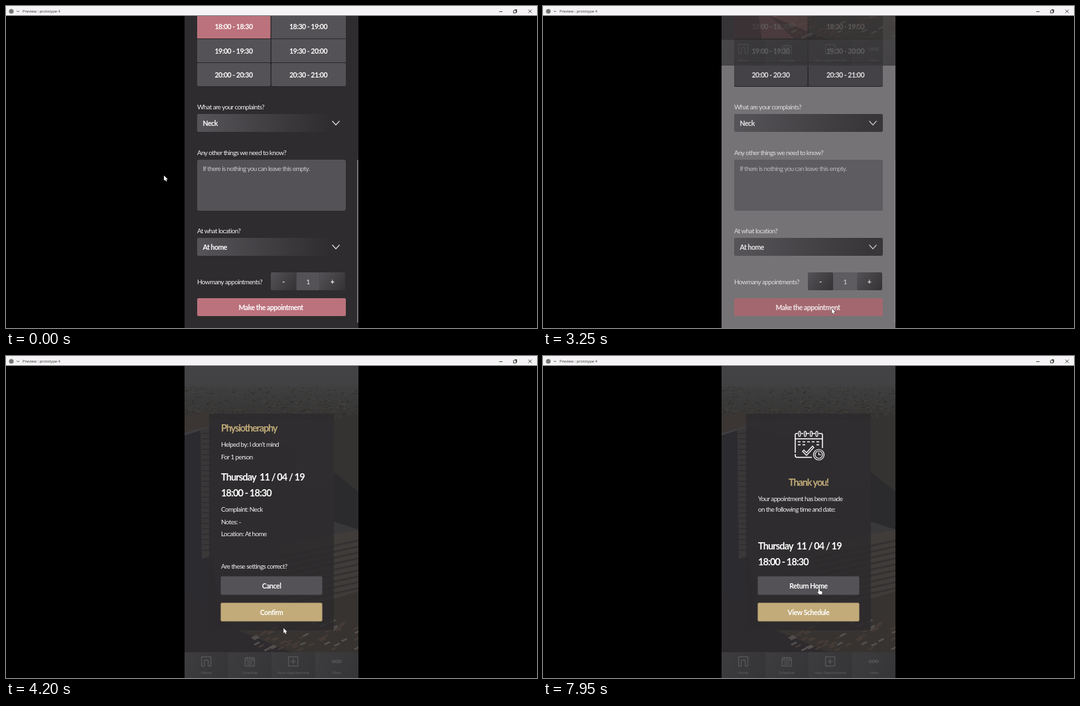
Animation, 800 px wide and 486 px high, one loop 8 s. Source, as an HTML page with a canvas:

```html
<!DOCTYPE html>
<html lang="en">
<head>
<meta charset="utf-8">
<title>Preview</title>
<style>
html, body { margin: 0; width: 100%; height: 100%; overflow: hidden; background: #000; }
canvas { display: block; }
</style>
</head>
<body>
<canvas id="stage" width="800" height="486"></canvas>
<script>
const ctx = document.getElementById('stage').getContext('2d');
const LOOP = 8000;
const PINK = [187, 114, 124], GREY = [84, 82, 86], DARK = [46, 44, 46];
const GOLD = '#c2ab79';

const ramp = (t, a, b) => Math.min(1, Math.max(0, (t - a) / (b - a)));
const ease = p => p * p * (3 - 2 * p);
const mix = (a, b, p) => `rgb(${a.map((v, i) => Math.round(v + (b[i] - v) * p))})`;

function box(x, y, w, h, fill, r = 0) {
  ctx.fillStyle = fill;
  ctx.beginPath();
  ctx.roundRect(x, y, w, h, r);
  ctx.fill();
}

function poly(fill, ...pts) {
  ctx.fillStyle = fill;
  ctx.beginPath();
  for (let i = 0; i < pts.length; i += 2) ctx.lineTo(pts[i], pts[i + 1]);
  ctx.fill();
}

function line(d, color, width = 1, x = 0, y = 0) {
  ctx.save();
  ctx.translate(x, y);
  ctx.strokeStyle = color;
  ctx.lineWidth = width;
  ctx.stroke(new Path2D(d));
  ctx.restore();
}

// tracking is the letter spacing in em.
function text(str, x, y, { size = 9.9, weight = 400, tracking = -0.06, color = '#f2f2f2', align = 'left' } = {}) {
  ctx.font = `${weight} ${size}px Lato, sans-serif`;
  ctx.letterSpacing = `${size * tracking}px`;
  ctx.textAlign = align;
  ctx.textBaseline = 'alphabetic';
  ctx.fillStyle = color;
  ctx.fillText(str, x, y + size * 0.36);
  ctx.letterSpacing = '0px';
}
const bold = { weight: 700, size: 10.5, tracking: -0.045, color: '#fff' };
const centred = { ...bold, align: 'center' };
const heading = { weight: 700, size: 14.5, tracking: -0.06, color: '#fff' };
const title = { ...heading, tracking: -0.08, color: GOLD };

function gradient(x0, y0, x1, y1, from, to) {
  const g = ctx.createLinearGradient(x0, y0, x1, y1);
  g.addColorStop(0, from);
  g.addColorStop(1, to);
  return g;
}

function titleBar() {
  box(0, 0, 800, 15, '#000');
  box(0, 0, 800, 14.4, '#f5f3f5');
  ctx.fillStyle = '#777';
  ctx.beginPath();
  ctx.arc(8, 8, 3.5, 0, 7);
  ctx.fill();
  line('M16 7l2 2 2-2', '#555', 0.9);
  ctx.font = '5.8px "Open Sans", sans-serif';
  ctx.textAlign = 'left';
  ctx.fillStyle = '#333';
  ctx.fillText('Preview : prototype 4', 25, 10);
  line('M743 8.5h5M765.5 6.5h3v4h-4v-4M766.5 6v-.5h3v4h-1M787 5.5l5 5m0-5l-5 5', '#333', 0.9);
}

function dropdown(label, value, y, fade) {
  text(label, 288, y - 11);
  ctx.globalAlpha = 1;
  box(288, y, 224, 27, gradient(288, 0, 490, 0, '#565458', mix(DARK, [66, 64, 66], fade)), 2);
  ctx.globalAlpha = 1 - 0.3 * fade;
  text(value, 296.5, y + 14, bold);
  line(`M491.5 ${y + 10.5}l5.5 6 5.5-6`, '#ddd', 1.2);
}

function formPage(fade) {
  box(269, 15, 262, 471, mix(DARK, [188, 186, 190], fade));
  const cell = mix(GREY, [52, 50, 54], fade);
  const pink = mix(PINK, [140, 95, 98], fade);
  box(288, 15, 224, 107, mix([42, 40, 42], [36, 34, 36], fade), 2);
  const textAlpha = 1 - 0.3 * fade;
  for (let i = 0; i < 6; i++) {
    const right = i % 2, row = i >> 1, start = 18 * 60 + i * 30;
    const clock = m => `${Math.floor(m / 60)}:${String(m % 60).padStart(2, '0')}`;
    const top = row ? 14 + row * 36 : 15;
    ctx.globalAlpha = 1;
    box(right ? 400 : 288, top, right ? 112 : 110.5, row ? 35 : 34, i ? cell : pink, row > 1 ? 2 : 0);
    ctx.globalAlpha = textAlpha;
    text(`${clock(start)} - ${clock(start + 30)}`, right ? 455.5 : 343, 31.5 + row * 36.3, centred);
  }
  dropdown('What are your complaints?', 'Neck', 163, fade);
  text('Any other things we need to know?', 288, 221);
  ctx.globalAlpha = 1;
  box(288, 232, 224, 77, mix(GREY, [104, 102, 106], fade), 3);
  ctx.globalAlpha = textAlpha;
  text('If there is nothing you can leave this empty.', 296.5, 245.5, { color: '#c9c8ca' });
  dropdown('At what location?', 'At home', 350, fade);
  text('Howmany appointments?', 288, 416);
  ctx.globalAlpha = 1;
  for (const x of [399, 472.5]) box(x, 402, 38.5, 27, gradient(x, 402, x + 38, 429, '#545256', '#343234'), 2);
  box(437.5, 402, 35, 27, mix(GREY, [104, 102, 106], fade));
  box(288, 441, 224, 27, pink, 2);
  ctx.globalAlpha = textAlpha;
  text('-', 418, 416, centred);
  text('1', 455, 416, { align: 'center' });
  text('+', 491.5, 416, centred);
  text('Make the appointment', 399, 455, centred);
  ctx.globalAlpha = 1;
  box(529, 232, 1.5, 246, '#858387', 1);

  if (fade) {
    ctx.save();
    ctx.beginPath();
    ctx.rect(269, 15, 262, 75);
    ctx.clip();
    ctx.globalAlpha = fade;
    ctx.translate(0, -396);
    cityPhoto();
    navBar();
    ctx.restore();
  }
}

// Simplified aerial city view, darkened.
function cityPhoto() {
  let seed = 7;
  const rnd = () => (seed = seed * 16807 % 2147483647) / 2147483647;
  ctx.save();
  ctx.beginPath();
  ctx.rect(269, 15, 262, 471);
  ctx.clip();
  box(269, 15, 262, 471, gradient(0, 15, 0, 486, '#434244', '#302e2f'));
  box(269, 46, 262, 50, gradient(0, 46, 0, 96, '#403f40', '#353433'));
  for (let i = 0; i < 700; i++) {
    const y = 46 + 50 * rnd(), v = 38 + 36 * rnd();
    box(269 + 262 * rnd(), y, 1 + 3 * rnd(), 0.7 + (y - 46) / 70, `rgb(${v},${v - 1},${v - 6})`);
  }
  poly('#2c2b30', 269, 120, 306, 108, 310, 300, 330, 447, 269, 447);
  poly('#3b3634', 269, 92, 306, 82, 306, 106, 269, 116);
  poly('#353331', 494, 95, 531, 88, 531, 260, 494, 220);
  poly('#2b2b2e', 494, 175, 531, 205, 531, 262, 494, 250);
  poly('#3a3738', 293, 112, 312, 106, 435, 140, 435, 330, 316, 300, 295, 306);
  for (let y = 116; y < 300; y += 8) box(295, y, 14, 2, '#312f31');
  poly('#403c3a', 410, 285, 531, 262, 531, 355, 410, 400);
  for (let y = 285; y < 385; y += 9) poly('#343132', 410, y + 18, 531, y - 8, 531, y - 5, 410, y + 22);
  poly('#373331', 345, 414, 531, 355, 531, 447, 380, 447);
  poly('#2d2b2d', 269, 350, 350, 414, 430, 447, 269, 447);
  for (let i = 0; i < 60; i++) {
    const x = 365 + 165 * rnd(), y = 400 + 44 * rnd();
    poly(i % 3 ? '#463c37' : '#55514f', x, y, x + 8, y - 4, x + 10, y - 2, x + 2, y + 2);
  }
  ctx.restore();
}

function navBar() {
  const items = [
    ['Home', 'M-7 7v-14h14v14h-4v-9h-6v9z'],
    ['Schedule', 'M-7-5h14v12h-14zM-7-2h14M-4-7v3M0-7v3M4-7v3M-4 1h8M-4 4h8'],
    ['New Appointment', 'M-7-7h14v14h-14zM-4 0h8M0-4v8'],
    ['More', 'M-7 0a2 2 0 1 0 4 0a2 2 0 1 0-4 0M-2 0a2 2 0 1 0 4 0a2 2 0 1 0-4 0M3 0a2 2 0 1 0 4 0a2 2 0 1 0-4 0']
  ];
  items.forEach(([label, icon], i) => {
    const x = 269 + i * 65.5;
    box(x, 447, 65.5, 39, gradient(x, 447, x + 65, 486, '#3d3c3e', '#353436'));
    line(icon, '#626163', 1, x + 32.7, 461);
    text(label, x + 32.7, 478, { size: 6.3, tracking: -0.03, align: 'center', color: '#5c5b5d' });
  });
}

function button(label, y, fill) {
  box(323.5, y - 0.5, 153, 28, fill, 2);
  text(label, 400, y + 14, centred);
}

function appointmentTime(y) {
  text('Thursday  11 / 04 / 19', 324, y, heading);
  text('18:00 - 18:30', 324, y + 24.5, heading);
}

function calendarIcon() {
  line('M380 146v-27q0-2 2-2h2M389 117h3M397 117h4M406 117h4M415 117h4q2 0 2 2v20M380 125h41M380 148v2q0 3 3 3h22', '#fff', 1.5);
  for (const x of [386.5, 395, 404, 412.5]) line('M-1.4 0a1.4 1.4 0 0 1 2.8 0v5a1.4 1.4 0 0 1-2.8 0z', '#fff', 1.2, x, 115);
  line('M384 129.5h4M391 129.5h4M398 129.5h4M405 129.5h4M412 129.5h4M384 134h4M391 134h4M412 134h4', '#fff', 1.4);
  line('M391 144l2-2 4 4 9-10 2 2-11 12z', '#fff', 1.3);
  line('M407.5 149a8 8 0 1 0 16 0a8 8 0 1 0-16 0M410 149a5.5 5.5 0 1 0 11 0a5.5 5.5 0 1 0-11 0M415.5 145.5v3.5h3.5', '#fff', 1.2);
}

function confirmContent() {
  text('Physiotheraphy', 324, 108.5, title);
  text('Helped by: I don’t mind', 324, 133.5);
  text('For 1 person', 324, 152);
  appointmentTime(182.5);
  text('Complaint: Neck', 324, 231.5);
  text('Notes: -', 324, 250);
  text('Location: At home', 324, 268.5);
  text('Are these settings correct?', 324, 317);
  button('Cancel', 333, '#545256');
  button('Confirm', 373, GOLD);
}

function thanksContent() {
  calendarIcon();
  text('Thank you!', 400, 190.5, { ...title, align: 'center' });
  text('Your appointment has been made', 324, 215.5);
  text('on the following time and date:', 324, 231.5);
  appointmentTime(286.5);
  button('Return Home', 333, '#545256');
  button('View Schedule', 373, GOLD);
}

function dialogPage(t) {
  cityPhoto();
  navBar();
  box(306, 87, 188, 327, 'rgba(44,42,44,.82)');
  const p = ramp(t, 5350, 5650);
  if (p < 1) {
    ctx.globalAlpha = 1 - p;
    confirmContent();
  }
  if (p > 0) {
    ctx.globalAlpha = p;
    thanksContent();
  }
  ctx.globalAlpha = 1;
}

// Pointer stops: time, x, y.
const stops = [
  [0, 238, 256], [300, 238, 256], [650, 392, 408], [1600, 392, 408], [2400, 425, 434.5],
  [2600, 425, 434.5], [3050, 435, 456.5], [3850, 435, 456.5], [4450, 408, 383.5],
  [5300, 408, 383.5], [6100, 411, 382.5], [6600, 411, 382.5], [7850, 415, 351], [LOOP, 415, 351]
];

function pointer(t) {
  const i = stops.findIndex(s => s[0] > t);
  const [t0, x0, y0] = stops[i - 1], [t1, x1, y1] = stops[i];
  const p = ease(ramp(t, t0, t1));
  const shape = new Path2D(t > 4350
    ? 'M0 .8q1-1.4 1.8 0v2.7l3.2.7q1 .3.8 1.6l-.7 3h-3.8l-2.8-3.3q0-1.2 1.5-.4z'
    : 'M0 0v7.5l1.8-1.6 1.2 2.8 1.4-.6-1.2-2.7h2.4z');
  ctx.save();
  ctx.translate(x0 + (x1 - x0) * p, y0 + (y1 - y0) * p);
  ctx.strokeStyle = '#222';
  ctx.lineWidth = 1;
  ctx.stroke(shape);
  ctx.fillStyle = '#fff';
  ctx.fill(shape);
  ctx.restore();
}

function draw(now) {
  const t = now % LOOP;
  ctx.globalAlpha = 1;
  box(0, 0, 800, 486, '#000');
  if (t < 3400) formPage(ramp(t, 3100, 3400));
  else dialogPage(t);
  titleBar();
  pointer(t);
  requestAnimationFrame(draw);
}
requestAnimationFrame(draw);
</script>
</body>
</html>
```
